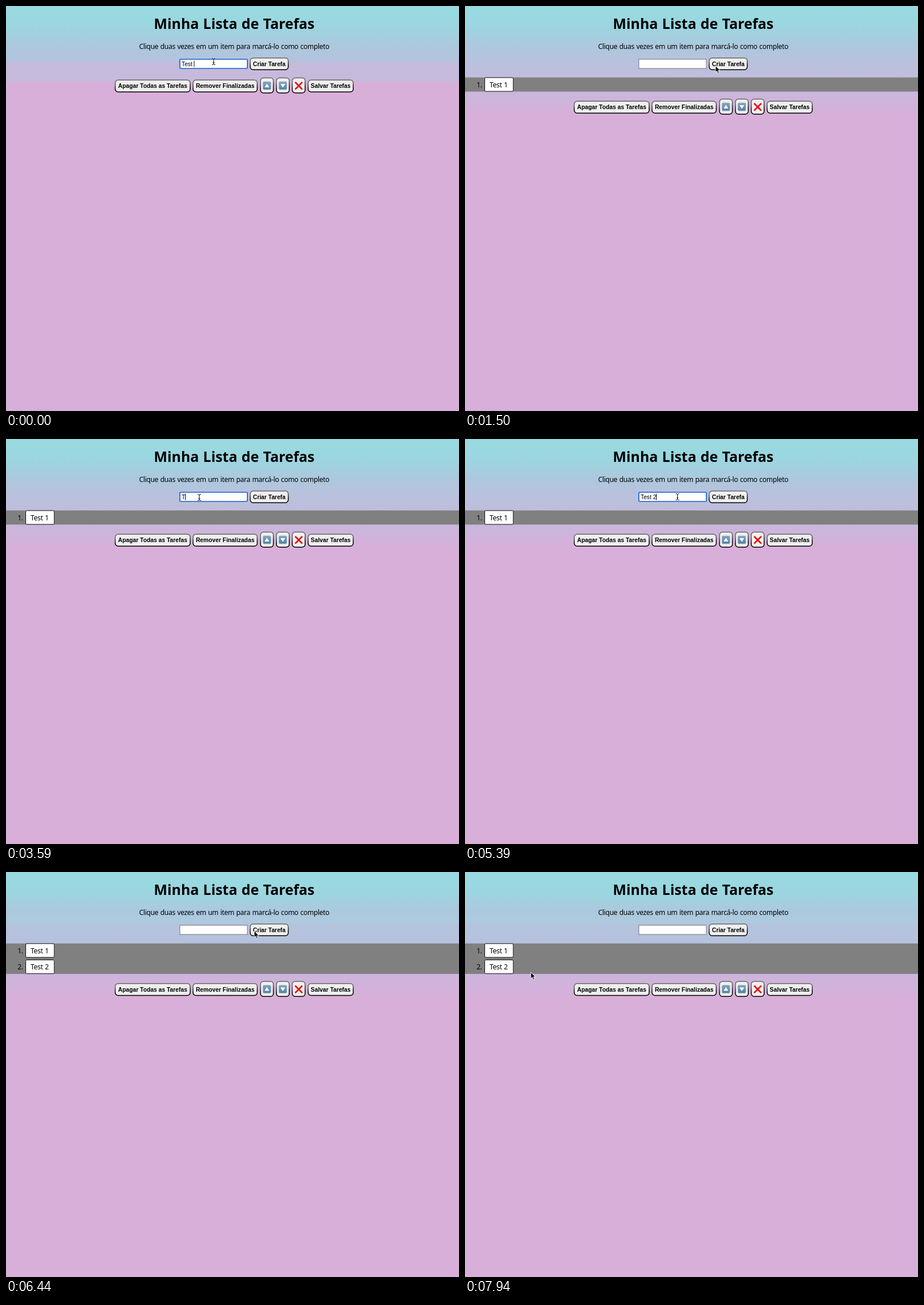
Write an HTML page that moves like this. It is 792 px wide and 707 px high and loops after 8 s.

```html
<!DOCTYPE html>
<html lang="pt-BR">
<head>
<meta charset="utf-8">
<title>Minha Lista de Tarefas</title>
<style>
  html, body { margin: 0; width: 100%; height: 100%; overflow: hidden; background: #d8afd9; }
  svg { display: block; width: 792px; height: 707px; }
  text { white-space: pre; }
  .page { font: 12.1px "Noto Sans", "Open Sans", sans-serif; letter-spacing: -.37px; word-spacing: .8px; }
  .title { font-size: 24.9px; font-weight: 700; letter-spacing: 0; word-spacing: .8px; }
  .mid { text-anchor: middle; }
  .ui { font: 10.3px "Liberation Sans", Arial, sans-serif; }
  .button rect { fill: #efefef; stroke: url(#outset); stroke-width: 1.5; }
  .button.pressed rect { fill: #f5f5f5; }
  .button text { font-weight: 700; text-anchor: middle; }
  .field { fill: #fff; stroke: #767676; stroke-width: 1; }
  .field.focus { stroke: #1660cf; stroke-width: 1.7; }
  .box { fill: #fff; stroke: #111; }
</style>
</head>
<body>
<svg viewBox="0 0 792 707">
  <defs>
    <linearGradient id="outset" x1="0" y1="0" x2=".15" y2="1">
      <stop offset=".3" stop-color="#666"/><stop offset=".75" stop-color="#000"/>
    </linearGradient>
    <linearGradient id="tile" x1="0" y1="0" x2="0" y2="1">
      <stop offset="0" stop-color="#83a5c2"/><stop offset="1" stop-color="#54809f"/>
    </linearGradient>
  </defs>
  <rect width="792" height="707" fill="#d8afd9"/>
  <rect id="sky" width="792"/>

  <text class="page title mid" x="399" y="40">Minha Lista de Tarefas</text>
  <text class="page mid" x="399" y="75">Clique duas vezes em um item para marcá-lo como completo</text>

  <rect id="field" class="field" x="304" y="93" width="118" height="16"/>
  <text id="typed" class="ui" x="307" y="104.5"></text>
  <rect id="caret" y="95.5" width="1" height="11"/>

  <g id="tasks"></g>
  <g id="top"></g>
  <g id="tools"></g>

  <g id="arrow">
    <path d="M0 0V11.2L2.6 8.9 4.3 12.9 6.3 12 4.6 8.1H8.1Z" stroke="#fff" stroke-width=".9" stroke-linejoin="round"/>
  </g>
  <g id="beam" fill="none" stroke-linecap="round">
    <path d="M-2.6-5.5Q0-5.5 0-4V4Q0 5.5-2.6 5.5M2.6-5.5Q0-5.5 0-4M2.6 5.5Q0 5.5 0 4M-1.3 1.8H1.3" stroke="#fff" stroke-opacity=".6" stroke-width="2"/>
    <path d="M-2.6-5.5Q0-5.5 0-4V4Q0 5.5-2.6 5.5M2.6-5.5Q0-5.5 0-4M2.6 5.5Q0 5.5 0 4M-1.3 1.8H1.3" stroke="#111"/>
  </g>
</svg>
<script>
const LOOP = 8000, STEP = 150, ROW = 28.5;
const $ = id => document.getElementById(id);

function add(parent, tag, attrs, content = '') {
  const node = document.createElementNS('http://www.w3.org/2000/svg', tag);
  for (const key in attrs) node.setAttribute(key, attrs[key]);
  node.textContent = content;
  return parent.appendChild(node);
}

function button(parent, x, y, width, height, label) {
  const group = add(parent, 'g', { class: 'button ui' });
  add(group, 'rect', { x, y, width, height, rx: 5 });
  if (label) add(group, 'text', { x: x + width / 2, y: y + height / 2 + 3.6 }, label);
  return group;
}

function tile(group, x, points) {
  add(group, 'rect', { x, y: 132, width: 14, height: 14, rx: 2, style: 'fill:url(#tile);stroke:#a9bfd2;stroke-width:.8' });
  add(group, 'path', { d: points, transform: `translate(${x + 7} 139)`, fill: '#fff', stroke: '#fff', 'stroke-linejoin': 'round' });
}

const create = button($('top'), 427, 90.8, 66.5, 20.5, 'Criar Tarefa');
const tools = $('tools');
button(tools, 191, 129.2, 131, 20.8, 'Apagar Todas as Tarefas');
button(tools, 327, 129.2, 112.3, 20.8, 'Remover Finalizadas');
tile(button(tools, 445, 125.6, 22.5, 26.2), 449.2, 'M0-2.8L3.4 2.4H-3.4Z');
tile(button(tools, 472.8, 125.6, 22.5, 26.2), 477, 'M0 2.8L3.4-2.4H-3.4Z');
add(button(tools, 500.5, 125.6, 22.5, 26.2), 'path',
  { d: 'M506.3 133.8L517.2 144.8M517.2 133.8L506.3 144.8', stroke: '#e5130f', 'stroke-width': 2.7, 'stroke-linecap': 'round' });
button(tools, 528.3, 129.2, 78.8, 20.8, 'Salvar Tarefas');

const band = add($('tasks'), 'rect', { y: 124.7, width: 792, fill: '#808080' });
const rows = [1, 2].map(n => {
  const row = add($('tasks'), 'g', { class: 'page', transform: `translate(0 ${(n - 1) * ROW})` });
  add(row, 'text', { x: 20.3, y: 141.6 }, n + '.');
  add(row, 'rect', { class: 'box', x: 34.5, y: 125, width: 49.8, height: 24, rx: 2 });
  add(row, 'text', { x: 43, y: 141.6 }, 'Test ' + n);
  return row;
});

// Gradient for each number of tasks: height, then [y, colour] stops.
const top3 = [[0, '#99d9e0'], [25, '#99d8e0'], [50, '#a2d0df'], [67, '#abc9de']];
const skies = [
  [133, [...top3, [98, '#b4c3dd'], [98, '#c4bbdc'], [132, '#c8b9dc']]],
  [189, [...top3, [90, '#b6c3dd'], [124, '#c0bddc'], [150, '#c9b7dc'], [189, '#d6b0d9']]],
  [219, [...top3, [90, '#aecade'], [90, '#b5c3dd'], [124, '#b6c2dd'], [178, '#ccb5dc'], [219, '#d6b0d9']]]
];
skies.forEach(([height, stops], i) => {
  const gradient = add(document.querySelector('defs'), 'linearGradient',
    { id: 'sky' + i, gradientUnits: 'userSpaceOnUse', x1: 0, y1: 0, x2: 0, y2: height });
  for (const [y, color] of stops) add(gradient, 'stop', { offset: y / height, 'stop-color': color });
});

// Each track lists [start time, value]; the value holds until the next entry.
const typing = [[0, 'Test '], [150, 'Test 1'], [1500, ''], [3590, 'T'], [3740, 'Tes'],
  [3890, 'Test'], [4340, 'Test '], [5090, 'Test 2'], [6440, '']];
const focus = [[0, true], [1350, false], [2400, true], [6290, false]];
const blink = [[0, true], [750, false], [1200, true], [3000, false], [3590, true],
  [4940, false], [5090, true], [5690, false], [6140, true]];
const press = [[0, false], [1350, true], [1500, false], [6290, true], [6440, false]];
const count = [[0, 0], [1500, 1], [6440, 2]];

// Pointer moves: one point every STEP from the given time on.
const moves = [
  [0, [[363, 97]]],
  [750, [[376, 93], [405, 84], [431, 90], [442, 98], [444, 101], [438, 104.5], [413, 118],
    [386, 121], [361, 117], [346, 107], [340, 103], [338, 102]]],
  [5390, [[371.5, 101], [407, 104], [428, 108], [434, 109], [435, 107], [434, 105], [434, 103],
    [434, 103], [419, 122], [350, 165], [260, 195], [190, 208], [150, 213], [128, 213],
    [124, 206], [119, 193], [116, 181], [115, 175]]]
];

const at = (track, t) => track.findLast(([start]) => t >= start)[1];

function pointer(t) {
  const [start, points] = moves.findLast(([from]) => t >= from);
  return points[Math.min(points.length - 1, Math.floor((t - start) / STEP))];
}

const show = (node, visible) => node.setAttribute('visibility', visible ? 'visible' : 'hidden');

function draw(t) {
  const focused = at(focus, t), tasks = at(count, t);
  const typed = $('typed'), text = at(typing, t);
  if (typed.textContent !== text) typed.textContent = text;
  $('field').setAttribute('class', focused ? 'field focus' : 'field');
  $('field').setAttribute('rx', focused ? 1.5 : 0);
  $('caret').setAttribute('x', 307 + (text ? typed.getComputedTextLength() - .3 : 0));
  show($('caret'), focused && at(blink, t));
  create.classList.toggle('pressed', at(press, t));

  $('sky').setAttribute('height', skies[tasks][0]);
  $('sky').setAttribute('fill', `url(#sky${tasks})`);
  band.setAttribute('height', tasks ? 24.7 + (tasks - 1) * ROW : 0);
  rows.forEach((row, i) => show(row, i < tasks));
  tools.setAttribute('transform', `translate(0 ${tasks ? 8.5 + tasks * ROW : 0})`);

  const [x, y] = pointer(t);
  const overField = x > 303 && x < 423 && y > 92 && y < 110;
  for (const id of ['arrow', 'beam']) $(id).setAttribute('transform', `translate(${x} ${y})`);
  show($('arrow'), !overField);
  show($('beam'), overField);
}

const began = performance.now();
function tick() {
  draw((performance.now() - began) % LOOP);
  requestAnimationFrame(tick);
}
tick();
</script>
</body>
</html>
```
